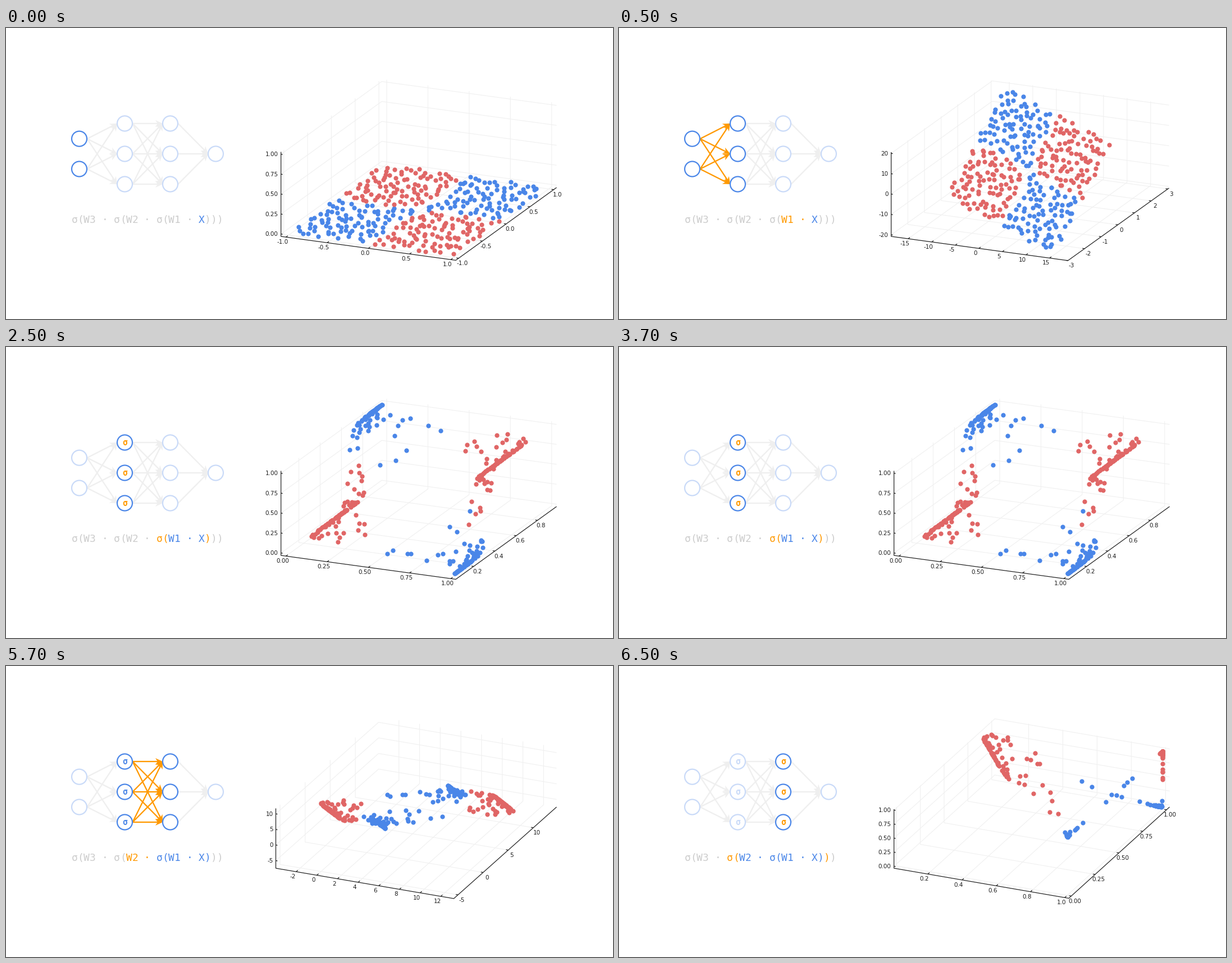
Write a matplotlib script that moves like this. It is 1081 by 518 pixels and loops after 8000 ms.

```python
import numpy as np
import matplotlib.pyplot as plt
from matplotlib.animation import FuncAnimation
from matplotlib.collections import LineCollection

W, H, DPI = 1081, 518, 64
PT = 72 / DPI  # points per pixel

BLUE, RED, ORANGE = "#4a86e8", "#e06666", "#ff9900"
PALE, GREY, FAINT = "#c9daf8", "#cccccc", "#efefef"
GRID, INK = "#f0f0f0", "#1c1c1c"

MONO, SANS = "DejaVu Sans Mono", "DejaVu Sans"
FORMULA = "σ(W3 · σ(W2 · σ(W1 · X)))"

LAYERS = [
    [(130.5, 197.2), (130.5, 251)],
    [(211.5, 170), (211.5, 224), (211.5, 278)],
    [(292.5, 170), (292.5, 224), (292.5, 278)],
    [(373.5, 224)],
]


# ---- data: a small network applied to points labelled by quadrant ----

def sigmoid(v):
    return 1 / (1 + np.exp(-v))


def forward(n=19, margin=0.02, seed=5):
    """Jittered n x n sample of the square, then each layer's output."""
    rng = np.random.default_rng(seed)
    cells = np.stack(np.meshgrid(np.arange(n), np.arange(n)), -1).reshape(-1, 2)
    x = 2 * (cells + rng.random(cells.shape)) / n - 1
    x = np.sign(x) * (margin + (1 - margin) * np.abs(x))
    same = x[:, 0] * x[:, 1] > 0
    w1 = np.array([[16.4, -1.1], [-1.45, -1.45], [-0.5, -19.0]])
    w2 = np.array([[7.4, 4.3, 6.7], [12.0, 0.0, -6.7], [-9.6, -8.5, 12.7]])
    b2 = np.array([-4.5, 1.7, 5.2])
    h1 = x @ w1.T
    a1 = sigmoid(h1)
    h2 = a1 @ w2.T + b2
    flat = np.column_stack([x, np.zeros(len(x))])
    return same, [flat, h1, a1, h2, sigmoid(h2)]


SAME, STAGES = forward()


# ---- 3D box, drawn with a parallel projection ----

class Box:
    """origin/right/far: floor corners in pixels, axes: (lo, hi, ticks, format)."""

    def __init__(self, origin, right, far, height, axes):
        self.origin = np.array(origin, float)
        self.edges = np.array([np.subtract(right, origin),
                               np.subtract(far, right), (0, -height)], float)
        self.axes = axes
        self.lo = np.array([a[0] for a in axes])
        self.hi = np.array([a[1] for a in axes])

    def project(self, p):
        return self.origin + (np.asarray(p) - self.lo) / (self.hi - self.lo) @ self.edges

    def corner(self, **fixed):
        p = self.lo.copy()
        for name, v in fixed.items():
            p["xyz".index(name)] = v
        return self.project(p)

    def draw(self, ax):
        xr, yr, zr = [a[2] for a in self.axes]
        x1, y1, z1 = self.hi
        c = self.corner
        grid = []
        for x in xr:
            grid.append([c(x=x), c(x=x, y=y1), c(x=x, y=y1, z=z1)])
        for y in yr:
            grid.append([c(x=x1, y=y), c(y=y), c(y=y, z=z1)])
        for z in zr:
            grid.append([c(z=z), c(y=y1, z=z), c(x=x1, y=y1, z=z)])
        ax.add_collection(LineCollection(grid, colors=GRID, linewidths=1.1 * PT, zorder=1))

        ex, ey, _ = [e / np.hypot(*e) for e in self.edges]
        lines = [[c(z=z1), c(), c(x=x1), c(x=x1, y=y1)]]
        for x in xr:
            self.tick(ax, lines, c(x=x), 4 * ey, (-6, 8), self.axes[0][3] % x)
        for y in yr:
            self.tick(ax, lines, c(x=x1, y=y), -4 * ex, (6.5, 8.5), self.axes[1][3] % y)
        for z in zr:
            self.tick(ax, lines, c(z=z), 3 * ex, (-5, -0.5), self.axes[2][3] % z, "right")
        ax.add_collection(LineCollection(lines, colors=INK, linewidths=1.2 * PT, zorder=2))

    @staticmethod
    def tick(ax, lines, p, stroke, offset, label, ha="center"):
        lines.append([p, p + stroke])
        x, y = p + offset
        ax.text(x, y + 3.9, label, family=SANS, size=10.4 * PT, color=INK,
                ha=ha, va="baseline", zorder=2)


def ticks(start, stop, n):
    return np.linspace(start, stop, n)


UNIT = (-0.03, 1.03, ticks(0, 1, 5), "%.2f")
SYM = (-1.06, 1.06, ticks(-1, 1, 5), "%.1f")
FLAT = ((489.7, 371), (801, 413.5), (980.5, 284))
STEEP = ((489.7, 360), (801, 413.5), (980.5, 251))

BOXES = [
    Box(*FLAT, 150.5, [SYM, SYM, UNIT]),
    Box((484.7, 371), (799.5, 414), (979.5, 285), 150,
        [(-18.6, 18.9, ticks(-15, 15, 7), "%d"),
         (-3.0, 3.07, ticks(-3, 3, 7), "%d"),
         (-20.8, 20.6, ticks(-20, 20, 5), "%d")]),
    Box(*FLAT, 150.5, [UNIT, (0.032, 0.979, ticks(0.2, 0.8, 4), "%.1f"), UNIT]),
    Box((480.5, 360), (797.5, 414), (980.5, 251), 106.5,
        [(-3.97, 13.26, ticks(-2, 12, 8), "%d"),
         (-5.84, 14.63, ticks(-5, 10, 4), "%d"),
         (-7.44, 11.75, ticks(-5, 10, 4), "%d")]),
    Box(*STEEP, 105,
        [(0.002, 1.0236, ticks(0.2, 1, 5), "%.1f"),
         (-0.0265, 1.032, UNIT[2], "%.2f"),
         (-0.035, 1.015, UNIT[2], "%.2f")]),
]


# ---- network and formula ----

# lit: bright layers, edges: bright edge set, sigma: symbol colour per layer,
# blue/orange: character ranges of the formula
STATES = [
    dict(lit=[0], edges=None, sigma={}, blue=(21, 22), orange=[]),
    dict(lit=[0, 1], edges=0, sigma={}, blue=(21, 22), orange=[(16, 20)]),
    dict(lit=[1], edges=None, sigma={1: ORANGE}, blue=(16, 22),
         orange=[(14, 16), (22, 23)]),
    dict(lit=[1, 2], edges=1, sigma={1: BLUE}, blue=(14, 23), orange=[(9, 13)]),
    dict(lit=[2], edges=None, sigma={1: PALE, 2: ORANGE}, blue=(9, 23),
         orange=[(7, 9), (23, 24)]),
]


def arrow(ax, a, b, color, z):
    a, b = np.array(a) + (14, 0), np.array(b) - (13.5, 0)
    d = (b - a) / np.hypot(*(b - a))
    n = np.array([-d[1], d[0]])
    ax.plot(*zip(a, b - 8 * d), color=color, lw=2.3 * PT, zorder=z)
    head = [b, b - 13 * d + 6 * n, b - 9 * d, b - 13 * d - 6 * n]
    ax.add_patch(plt.Polygon(head, fc=color, ec="none", zorder=z))


def draw_network(ax, lit, edges, sigma):
    for k in range(3):
        color, z = (ORANGE, 4) if k == edges else (FAINT, 3)
        for a in LAYERS[k]:
            for b in LAYERS[k + 1]:
                arrow(ax, a, b, color, z)
    for k, layer in enumerate(LAYERS):
        for x, y in layer:
            ax.add_patch(plt.Circle((x, y), 13.5, fc="white", lw=2.2 * PT, zorder=5,
                                    ec=BLUE if k in lit else PALE))
            if k in sigma:
                ax.text(x, y + 5, "σ", family=MONO, weight="bold", size=14.5 * PT,
                        color=sigma[k], ha="center", va="baseline", zorder=6)


def draw_formula(ax, blue, orange):
    colors = [GREY] * len(FORMULA)
    for color, spans in ((BLUE, [blue]), (ORANGE, orange)):
        for i, j in spans:
            colors[i:j] = [color] * (j - i)
    for i, (ch, color) in enumerate(zip(FORMULA, colors)):
        if ch != " ":
            ax.text(116.5 + 10.8 * i, 347, ch, family=MONO, size=17.9 * PT,
                    color=color, ha="left", va="baseline")


def draw_points(ax, pts):
    for mask, color in ((SAME, BLUE), (~SAME, RED)):
        ax.scatter(*pts[mask].T, s=(8.2 * PT) ** 2, c=color, linewidths=0, zorder=7)


def make_scene(box, data, state):
    ax = fig.add_axes([0, 0, 1, 1])
    ax.set_xlim(0, W)
    ax.set_ylim(H, 0)
    ax.axis("off")
    draw_network(ax, state["lit"], state["edges"], state["sigma"])
    draw_formula(ax, state["blue"], state["orange"])
    box.draw(ax)
    draw_points(ax, box.project(data))
    return ax


fig = plt.figure(figsize=(W / DPI, H / DPI), dpi=DPI, facecolor="white")
scenes = [make_scene(*args) for args in zip(BOXES, STAGES, STATES)]


def update(i):
    step = (i + 3) // 4  # half a second on the input, then two seconds per step
    for k, ax in enumerate(scenes):
        ax.set_visible(k == step)
    return scenes


anim = FuncAnimation(fig, update, frames=16, interval=500, repeat=True,
                     repeat_delay=0, blit=False)
plt.show()
```
